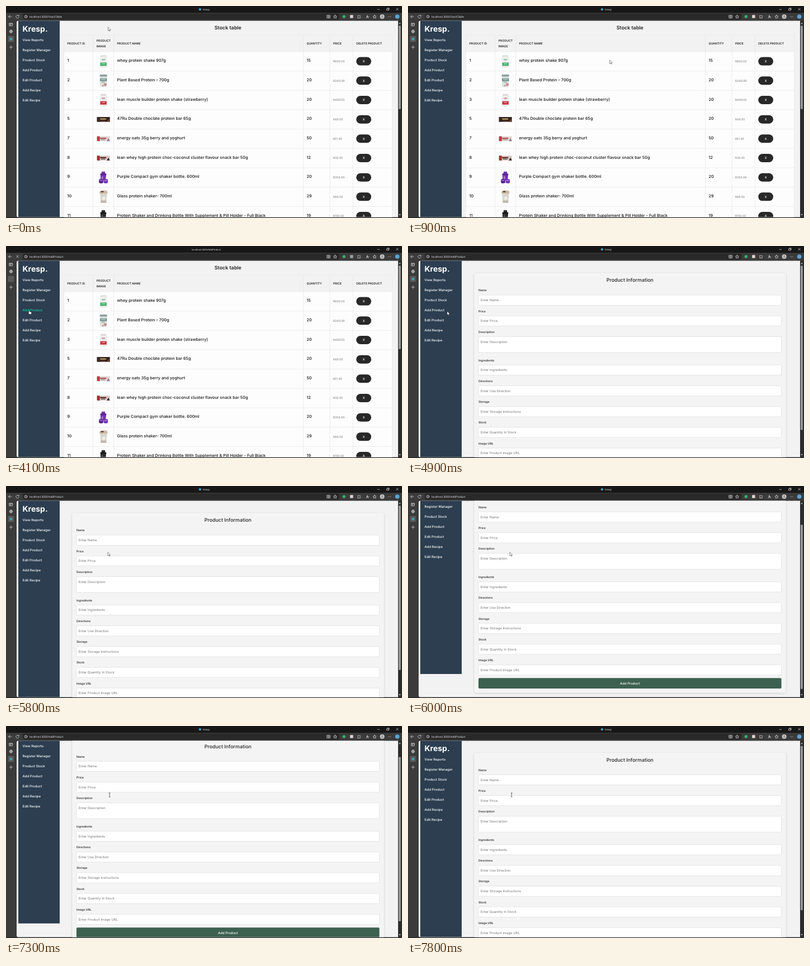
These frames come from a looping animation (708 px wide and 380 px high, 8000 ms). An HTML page:

```html
<!DOCTYPE html>
<html lang="en">
<head>
<meta charset="utf-8">
<title>Stock manager</title>
<style>
html, body { margin: 0; width: 100%; height: 100%; overflow: hidden; background: #3b3b3b; }
svg { display: block; width: 708px; height: 380px; }
text { font-family: Inter, sans-serif; text-rendering: geometricPrecision; white-space: pre; }
.ui { font-family: "Open Sans", "Noto Sans", sans-serif; fill: #f2f2f2; }
.ico { fill: none; stroke: #d6d6d6; stroke-width: .75; stroke-linecap: round; stroke-linejoin: round; }
.menu { font-size: 5.95px; font-weight: 500; fill: #fff; }
.th { font-size: 5.16px; font-weight: 600; fill: #222; }
.td { font-size: 7.3px; font-weight: 500; fill: #141414; }
.price { font-size: 5.16px; fill: #777; }
.label { font-size: 5.16px; font-weight: 600; fill: #333; }
.hint { font-size: 5.9px; fill: #757575; }
</style>
</head>
<body>
<svg id="stage" viewBox="0 0 708 380" xmlns="http://www.w3.org/2000/svg"></svg>
<script>
const LOOP = 8000, STEP = 100, MAX_SCROLL = 48.8, ROW = 34.68;
const BRAND = 'Kresp';

const rect = (x, y, w, h, fill, extra = '') =>
  `<rect x="${x}" y="${y}" width="${w}" height="${h}" fill="${fill}" ${extra}/>`;
const circle = (x, y, r, fill, extra = '') =>
  `<circle cx="${x}" cy="${y}" r="${r}" fill="${fill}" ${extra}/>`;
const path = (d, extra = '') => `<path d="${d}" ${extra}/>`;
const text = (x, y, s, cls, extra = '') =>
  `<text x="${x}" y="${y}" class="${cls}" ${extra}>${s}</text>`;
const group = (body, extra = '') => `<g ${extra}>${body}</g>`;
const at = (x, y, body) => group(body, `transform="translate(${x} ${y})"`);

// Product pictures, centred on 0,0
const tub = (label, lid, mid) =>
  rect(-5, -11, 10, 3.5, lid, 'rx="1"') +
  rect(-6, -8, 12, 19, '#f1f1f1', 'rx="1.6" stroke="#d2d2d2" stroke-width=".4"') +
  rect(-3.4, -4, 6.8, 1.3, mid) + rect(-2.6, -1.6, 5.2, .7, '#aaa') +
  rect(-5.6, 2.2, 11.2, 6, label) + rect(-3, 4, 6, 1.2, '#fff', 'opacity=".7"');
const jar =
  rect(-6.6, -11, 13.2, 4, '#8fa39f', 'rx="1"') +
  rect(-6.2, -7, 12.4, 18.5, '#dfe3df', 'rx="1.4"') +
  rect(-6.2, -4, 12.4, 5, '#6f918b') + rect(-4, -2.4, 8, 1, '#e8efed') +
  rect(-3.6, 2.4, 6, 1, '#8b8b8b') + circle(3.2, 7, 2.6, '#c98d93') + circle(-1, 9, 1.6, '#b9a48f');
const bar = (base, end, strip, mark) =>
  rect(-11.5, -4.2, 23, 8.6, base, 'rx=".6"') +
  rect(-11.5, -4.2, 5, 8.6, end) + rect(-6, -1.8, 11, 2.3, strip) +
  rect(-4.5, 1.4, 8, 1, mark) + path('M6 4.4L9 -1L11.5 4.4Z', `fill="${mark}"`);
const shaker = (main, dark, light) =>
  path('M-3 -10.5H2.6L3.6 -6H5L4 5H-5L-5.4 -6H-4Z', `fill="${main}"`) +
  rect(-5.8, -6.6, 11, 2.2, dark, 'rx=".8"') + rect(-3, -2, 2, 6, light) +
  rect(-8, 3, 7.6, 7.6, dark, 'rx="2"') + rect(.4, 3, 7.6, 7.6, main, 'rx="2"') +
  rect(-6.6, 5, 4.6, 1.4, light) + rect(2, 5, 4.6, 1.4, light);
const cup =
  path('M-6.4 -8H6.6L5 11H-4.6Z', 'fill="#d9d5ce"') +
  path('M-7 -8.4Q-6.6 -11 -2 -11.4H3Q7 -11 7.2 -8.4V-5.6H-7Z', 'fill="#cdb9a6"') +
  rect(-4.6, -10, 5, 2.2, '#4b4039', 'rx="1"') + circle(.4, 2.6, 3, '#efece7') +
  path('M-5 7H5.4L5 11H-4.6Z', 'fill="#bfb7ad"');

const products = [
  [1, 'whey protein shake 907g', 15, '600.00', tub('#3fae6a', '#d9e6dc', '#6cae86')],
  [2, 'Plant Based Protein – 700g', 20, '349.99', jar],
  [3, 'lean muscle builder protein shake (strawberry)', 20, '499.00', tub('#c62a3c', '#e4d9da', '#c56a74')],
  [5, '47Ru Double choclate protein bar 65g', 20, '49.95', bar('#2c211c', '#3a2a22', '#b99a6a', '#7d3a2a')],
  [7, 'energy oats 35g berry and yoghurt', 50, '51.95', bar('#e2d6d3', '#c4343e', '#b5505c', '#8f7a84')],
  [8, 'lean whey high protein choc-coconut cluster flavour snack bar 50g', 12, '36.95', bar('#d9cbc6', '#b3262e', '#5a2a28', '#3b2a26')],
  [9, 'Purple Compact gym shaker bottle. 600ml', 20, '354.99', shaker('#7434b4', '#4f2287', '#b48ae0')],
  [10, 'Glass protein shaker- 700ml', 29, '89.00', cup],
  [11, 'Protein Shaker and Drinking Bottle With Supplement &amp; Pill Holder - Full Black', 19, '159.00', shaker('#2a2a2a', '#161616', '#555')]
];

function stockPage() {
  let s = text(396.8, 42.2, 'Stock table', '', 'font-size="8.85" font-weight="600" fill="#222" text-anchor="middle"');
  s += rect(103.5, 52.3, 587, 330, '#fdfdfd') + rect(103.5, 52.3, 587, 29.6, '#f2f2f2');
  s += text(109.5, 68.9, 'PRODUCT ID', 'th') + text(161.8, 63.9, 'PRODUCT', 'th') +
    text(161.8, 74, 'IMAGE', 'th') + text(198.5, 68.9, 'PRODUCT NAME', 'th') +
    text(537.4, 68.9, 'QUANTITY', 'th') + text(584.9, 68.9, 'PRICE', 'th') +
    text(626.2, 68.9, 'DELETE PRODUCT', 'th');
  let lines = 'M103.5 52.3H690.5';
  for (const x of [103.5, 155.5, 192.7, 531.5, 579, 620.4, 690.5]) lines += `M${x} 52.3V380`;
  products.forEach(([id, name, count, price, picture], i) => {
    const y = 81.9 + i * ROW;
    lines += `M103.5 ${y}H690.5`;
    s += at(0, y,
      text(109.4, 18.5, id, 'td') + text(198.5, 18.5, name, 'td') + text(537.4, 18.5, count, 'td') +
      text(584.8, 19, 'R' + price, 'price') +
      rect(626.2, 9.7, 26.8, 15, '#282828', 'rx="7.5"') +
      text(639.6, 19.1, 'X', '', 'font-size="5.2" font-weight="600" fill="#fff" text-anchor="middle"') +
      at(174.2, 17.2, picture));
  });
  return s + path(lines, 'fill="none" stroke="#e2e2e2" stroke-width=".6"');
}

function formPage() {
  const fields = [['Name', 'Name'], ['Price', 'Price'], ['Description', 'Description'],
    ['Ingredients', 'Ingredients'], ['Directions', 'Use Direction'],
    ['Storage', 'Storage Instructions'], ['Stock', 'Quantity In Stock'],
    ['Image URL', 'Product Image URL']];
  let s = rect(118.3, 48.6, 557.4, 363.6, '#f4f4f4', 'rx="3" filter="url(#soft)"');
  s += text(396.8, 64.4, 'Product Information', '', 'font-size="8.85" font-weight="500" fill="#222" text-anchor="middle"');
  fields.forEach(([label, hint], i) => {
    const y = 79.6 + i * 37.23 + (i > 2 ? 13.6 : 0);
    s += text(126, y + 1.8, label, 'label') +
      rect(126, y + 8.4, 541.6, i === 2 ? 28.4 : 18.3, '#fff', 'rx="1.8" stroke="#d0d0d0" stroke-width=".5"') +
      text(129.8, y + 19.6, 'Enter ' + hint, 'hint');
  });
  return s + rect(126, 385.9, 541.6, 18.7, '#3d6150', 'rx="1.8"') +
    text(396.8, 397.4, 'Add Product', 'menu', 'text-anchor="middle"');
}

function sidebar() {
  const items = ['View Reports', 'Register Manager', 'Product Stock', 'Add Product',
    'Edit Product', 'Add Recipe', 'Edit Recipe'];
  return rect(22, 20, 74, 358.6, '#2c3e50') +
    text(29.5, 45.8, BRAND + '.', '', 'font-size="14" font-weight="700" fill="#fff"') +
    items.map((s, i) => text(29.6, 62.7 + i * 18.05, s, 'menu', i === 3 ? 'id="link"' : '')).join('');
}

function browser() {
  const icons =
    'M10 19H4.6M7 16.6L4.6 19L7 21.4' +
    'M574.2 16.6H579.4V21.6H574.2ZM576.8 16.6V21.6M574.2 19H579.4' +
    'M588.5 16.2L589.4 18.2L591.5 18.4L589.9 19.8L590.4 21.9L588.5 20.8L586.6 21.9L587.1 19.8L585.5 18.4L587.6 18.2Z' +
    'M628.8 17.4H630.2A1 1 0 0 1 632 17.4H633.2V21.6H628.8V20.2A1 1 0 0 0 628.8 18.4Z' +
    'M644.4 21.6L646 16.6L647.4 21.6M645 19.6H648.8' +
    'M659 16.2L660 18.2L662 18.5L660.5 19.9L660.8 21.9L659 21L657.2 21.9L657.5 19.9L656 18.5L658 18.2Z' +
    'M664 6.2H667.6M681 4.8H684V7.8H681ZM682 4.8V3.8H685V6.8H684M697.8 4.2L701.2 7.6M701.2 4.2L697.8 7.6' +
    'M6.2 30.8H11.4V35.6H6.2ZM6.2 32.2H11.4M8 32.2V35.6' +
    'M6.3 45.6H11.7M9 42.9Q6.7 45.6 9 48.3Q11.3 45.6 9 42.9' +
    'M6.4 73.8H11.6M9 71.2V76.4';
  return rect(0, 0, 708, 12.4, '#171717') + rect(0, 12.4, 708, 13.8, '#3b3b3b') +
    rect(0, 26.2, 19, 354, '#3b3b3b') + rect(0, 378.6, 708, 1.4, '#2b2b2b') +
    rect(30, 13.6, 566.5, 11, '#292929', 'rx="3"') +
    path(icons, 'class="ico"') +
    circle(35.5, 19, 2.4, 'none', 'class="ico"') + path('M35.5 18.8V20.3M35.5 17.6V17.7', 'class="ico"') +
    circle(9, 45.6, 2.7, 'none', 'class="ico"') +
    path('M22.7 17.6A2.7 2.7 0 1 0 23.2 19.6M23 16.2V17.8H21.4', 'class="ico" id="reload"') +
    path('M18.6 17L22.4 20.8M22.4 17L18.6 20.8', 'class="ico" id="stop"') +
    circle(604.3, 19, 2.7, '#35b26b') + rect(615.2, 16.2, 5.4, 5.4, '#e6d3d3', 'id="ext"') +
    circle(672.6, 19, 4, '#c9c9c9') + circle(672.6, 17.9, 1.5, '#8b8b8b') +
    path('M669.9 21A2.8 2 0 0 1 675.3 21Z', 'fill="#8b8b8b"') +
    [683.8, 685.8, 687.8].map(x => circle(x, 19, .55, '#d6d6d6')).join('') +
    circle(699.6, 19, 3.8, '#5aa6dc') +
    rect(3.4, 53.8, 10.8, 10.8, '#595959', 'rx="2"') +
    group(circle(9, 59.2, 2.3, '#3fa3bb') + circle(346.9, 6.1, 2.2, '#3fa3bb'), 'id="favicons"') +
    text(352, 7.6, BRAND, 'ui', 'id="tab" font-size="4.5"') +
    text(332, 7.6, 'localhost:3000/AddProduct', 'ui', 'id="busy" font-size="4.15"') +
    text(42, 20.8, '', 'ui', 'id="url" font-size="4.8"');
}

const stage = document.getElementById('stage');
stage.innerHTML =
  `<defs><clipPath id="view"><path d="M22 26.4H701V378.6H22Q19 378.6 19 375.6V29.4Q19 26.4 22 26.4Z"/></clipPath>
  <filter id="soft" x="-5%" y="-5%" width="110%" height="110%"><feDropShadow dx="0" dy=".8" stdDeviation="1.6" flood-opacity=".2"/></filter></defs>` +
  browser() +
  group(rect(19, 26, 682, 353, '#f2f2f2') +
    group(sidebar() + group(stockPage(), 'id="stock"') + group(formPage(), 'id="form"'), 'id="scroll"'),
    'clip-path="url(#view)"') +
  rect(701, 26.4, 7, 352.2, '#2c2c2c') +
  path('M702 32.2H706L704 29.4ZM702 373H706L704 375.8Z', 'fill="#a5a5a5"') +
  rect(702.1, 35, 3.7, 150, '#9c9c9c', 'rx="1.8" id="thumb"') +
  group(
    path('M0 0V6.6L1.6 5.2L2.7 7.5L3.7 7L2.7 4.9H4.8Z', 'id="arrow" fill="#fff" stroke="#222" stroke-width=".5" stroke-linejoin="round"') +
    path('M0 .4Q.6 -.3 1.2 .4V2.8L4 3.4Q4.6 3.6 4.5 4.4L4 7.2H.9L-1.2 4.6Q-1.2 3.6 0 4.2Z', 'id="hand" fill="#fff" stroke="#222" stroke-width=".4"') +
    path('M-1.4 -3.5H1.4M0 -3.5V3.5M-1.4 3.5H1.4', 'id="beam" fill="none" stroke="#333" stroke-width=".7"'),
    'id="cursor"');

const el = id => document.getElementById(id);
const show = (id, on) => el(id).setAttribute('display', on ? 'inline' : 'none');

// Each pose: time, shape, x, y; it holds until the next one
const poses = [
  [0, 'arrow', 182.5, 37.8], [500, 'arrow', 360.6, 95.2], [900, 'arrow', 360.6, 96.8],
  [2100, 'arrow', 364, 116.5], [2300, 'arrow', 190, 111], [2400, 'arrow', 60, 106],
  [2500, 'arrow', 36.3, 105.6], [2600, 'arrow', 35.8, 107], [2700, 'arrow', 35, 108.6],
  [2900, 'hand', 34, 113], [3800, 'hand', 43, 115.5], [3900, 'hand', 41, 115],
  [4900, 'arrow', 70, 117], [5000, 'arrow', 140, 127], [5100, 'beam', 191.5, 136.4],
  [5300, 'beam', 191.5, 131.5], [5500, 'beam', 189.7, 128.6],
  [5800, 'arrow', 182, 118.6], [7000, 'beam', 185.2, 123.5]
];

// Share of a scroll still to go, critically damped
const rest = (t, start, rate) => {
  const x = Math.max(0, t - start) / 1000 * rate;
  return (1 + x) * Math.exp(-x);
};
const scrollAt = t => MAX_SCROLL * (t < 7120 ? 1 - rest(t, 5800, 17) : rest(t, 7120, 9.2));

function draw(t) {
  const onForm = t >= 4200, loading = t >= 4100 && !onForm, y = scrollAt(t);
  show('stock', !onForm);
  show('form', onForm);
  show('stop', loading);
  show('reload', !loading);
  show('busy', loading);
  show('tab', !loading);
  show('favicons', !loading);
  el('ext').setAttribute('fill', loading ? '#a0a0a0' : '#e6d3d3');
  el('url').textContent = 'localhost:3000/' + (t >= 4100 ? 'AddProduct' : 'StockTable');
  el('link').style.fill = t >= 2900 && t < 4900 ? '#1fc8a0' : '#fff';
  el('scroll').setAttribute('transform', `translate(0 ${-y})`);
  el('thumb').setAttribute('y', 35 + y * .82);
  el('thumb').setAttribute('height', onForm ? 295 : 150);

  const [, shape, cx, cy] = poses.filter(p => p[0] <= t).pop();
  for (const id of ['arrow', 'hand', 'beam']) show(id, id === shape);
  el('cursor').setAttribute('transform', `translate(${cx} ${cy})`);
}

const start = performance.now();
function tick() {
  const t = (performance.now() - start) % LOOP;
  draw(Math.floor(t / STEP) * STEP);
  requestAnimationFrame(tick);
}
tick();
</script>
</body>
</html>
```
